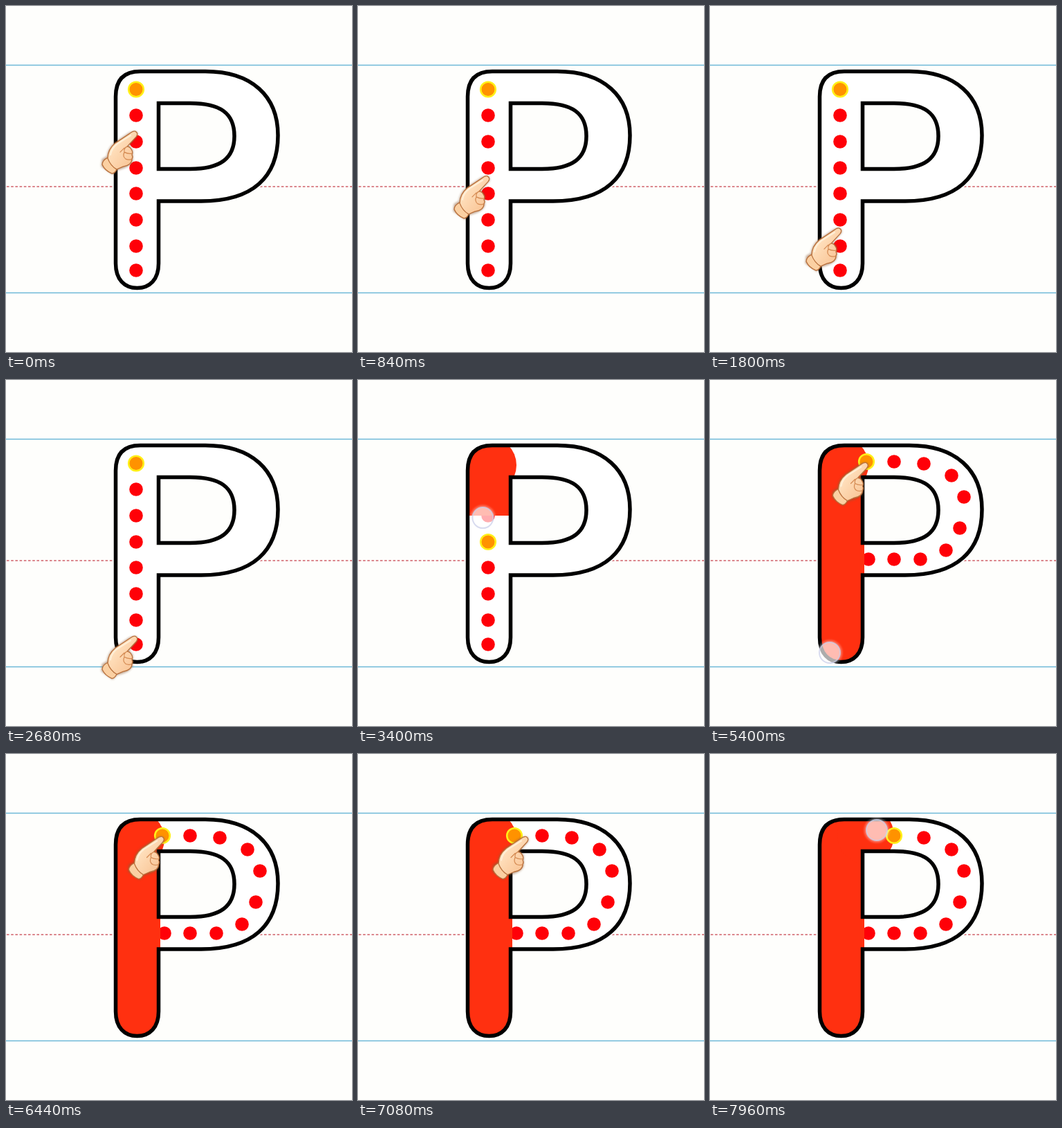
Write an HTML page that moves like this. It is 500 by 500 pixels and loops after 8000 ms.

```html
<!DOCTYPE html>
<html lang="en">
<head>
<meta charset="utf-8">
<title>Letter tracing</title>
<style>
  html, body { margin: 0; width: 100%; height: 100%; overflow: hidden; background: #fefefc; }
  svg { display: block; width: 100%; height: 100%; }
</style>
</head>
<body>
<svg viewBox="0 0 500 500">
  <defs>
    <path id="letter" fill-rule="evenodd" clip-rule="evenodd" d="
      M158.5 131C158.5 107 170 94.5 194 94.5H288C355 94.5 393 130 393 187
      C393 247 357 282 282 282H220.5V372C220.5 395 208 407.5 189.500 407.5
      C171 407.5 158.500 395 158.5 372Z
      M220.5 140.500H266C310 140.500 330 155 330 188C330 220 310 235.500 266 235.500H220.5Z"/>
    <clipPath id="inside"><use href="#letter"/></clipPath>
    <linearGradient id="skin" x1="0" y1="0" x2="1" y2="1">
      <stop offset=".3" stop-color="#ffe0bd"/>
      <stop offset="1" stop-color="#f7bd8b"/>
    </linearGradient>
    <filter id="soft" x="-30%" y="-30%" width="160%" height="160%">
      <feGaussianBlur stdDeviation="1.6"/>
    </filter>
  </defs>

  <path d="M0 85.500H500M0 414.500H500" stroke="#6db8d8" stroke-width="1.600"/>
  <path d="M1 261H500" stroke="#d0606a" stroke-width="1.500" stroke-dasharray="3.600 2.600"/>
  <use href="#letter" fill="#fff" stroke="#fefefc" stroke-width="9"/>
  <g id="dots" fill="#ff0008"></g>
  <g clip-path="url(#inside)" fill="#ff3010">
    <circle id="stemCap" cx="188" cy="123" r="41"/>
    <rect id="stem" x="153" y="123" width="70"/>
    <circle id="bowlCap" cx="225" cy="118" r="41"/>
  </g>
  <use href="#letter" fill="none" stroke="#000" stroke-width="5.500"/>
  <circle id="active" r="10.800" fill="#ff9200" stroke="#fff019" stroke-width="2.600"/>

  <g id="touch">
    <circle r="18" fill="#fff" opacity=".35" filter="url(#soft)"/>
    <circle r="15" fill="#fff" fill-opacity=".5" stroke="#cbcfea" stroke-opacity=".75" stroke-width="2"/>
  </g>

  <!-- Drawn with the fingertip at the origin -->
  <g id="hand" stroke-linejoin="round" stroke-linecap="round">
    <path d="M-6 0L-27 14Q-37 22-38 34L-45 38L-46 47L-31 58L-25 52Q-6 48-3 39
      L-3 24L-9 18L4 3Q5-5-6 0Z" fill="#8b5a35" stroke="#8b5a35" stroke-width="3"
      opacity=".5" filter="url(#soft)"/>
    <path d="M-38 35Q-46 39-46 45Q-42 54-32 58Q-28 58-25 52Z"
      fill="#fbd0a2" stroke="#b9713d" stroke-width="1.300"/>
    <path d="M-6 0L-27 14Q-38 23-38 36Q-34 47-25 52L-16 48Q-3 46-3 37
      Q-1 34-3 31Q-1 27-4 23Q-6 19-10 19L3 5Q7 0 2-3Q-1-4-6 0Z"
      fill="url(#skin)" stroke="#b9713d" stroke-width="1.300"/>
    <path d="M-10 19Q-15 21-14 27Q-9 30-3 29M-14 27Q-17 33-12 37Q-7 39-3 37
      M-14 21L-20 27" fill="none" stroke="#d48a52" stroke-width="1.200"/>
    <path d="M-34 31Q-33 22-24 15L-5 3" fill="none" stroke="#fff0d9" stroke-width="2"/>
  </g>
</svg>
<script>
const LOOP = 8000;
const HAND_PERIOD = 5100;
const STEM_DONE = 5080;
const stemDots = [120.5, 158, 196, 234, 271, 309, 347, 382].map(y => [188, y]);
const bowlDots = [[226, 118], [266, 118], [309, 121], [349, 138], [367, 169],
  [361, 214], [341, 246], [304, 259], [266, 259], [229, 259]];
// Each stop: time, x, y
const stemDrag = [[2850, 184, 118], [4080, 176, 299], [4950, 173, 394]];
const bowlDrag = [[7450, 228, 112], [7960, 241, 110]];

const el = id => document.getElementById(id);
const clamp = v => Math.min(1, Math.max(0, v));
const show = (node, visible) => node.setAttribute('display', visible ? 'inline' : 'none');
const place = (node, [x, y]) => node.setAttribute('transform', `translate(${x} ${y})`);
const easeSine = u => (1 - Math.cos(Math.PI * clamp(u))) / 2;

function along(stops, t) {
  let i = 1;
  while (i < stops.length - 1 && t > stops[i][0]) i++;
  const [a, b] = [stops[i - 1], stops[i]];
  const u = clamp((t - a[0]) / (b[0] - a[0]));
  return [a[1] + (b[1] - a[1]) * u, a[2] + (b[2] - a[2]) * u];
}

function dotGroup(points) {
  const group = document.createElementNS('http://www.w3.org/2000/svg', 'g');
  group.innerHTML = points.map(([x, y]) => `<circle cx="${x}" cy="${y}" r="9.800"/>`).join('');
  el('dots').append(group);
  return group;
}
const stemGroup = dotGroup(stemDots);
const bowlGroup = dotGroup(bowlDots);

function render(t) {
  const onBowl = t >= STEM_DONE;
  const stemTouched = t >= stemDrag[0][0];
  const bowlTouched = t >= bowlDrag[0][0];
  const finger = along(bowlTouched ? bowlDrag : stemDrag, t);

  // The fill advances from dot to dot as the finger reaches them
  const reached = !stemTouched ? 0 : onBowl ? stemDots.length
    : stemDots.filter(([, y]) => finger[1] + 6 >= y).length;
  const stemEnd = reached === stemDots.length ? 420 : reached > 1 ? stemDots[reached - 1][1] : 123;
  show(el('stemCap'), reached > 0);
  el('stem').setAttribute('height', stemEnd - 123);
  show(el('bowlCap'), bowlTouched);

  show(stemGroup, !onBowl);
  show(bowlGroup, onBowl);
  const target = onBowl ? bowlDots[bowlTouched ? 1 : 0] : stemDots[reached];
  show(el('active'), target);
  if (target) place(el('active'), target);

  const release = bowlTouched ? 0 : clamp((t - 5420) / 230);
  show(el('touch'), stemTouched && release < 1);
  el('touch').setAttribute('opacity', 1 - release);
  place(el('touch'), finger);

  show(el('hand'), t < 2780 || onBowl && t < 7420);
  place(el('hand'), onBowl
    ? [223.500 + 430 * easeSine((t - 6420) / HAND_PERIOD), 122.500]
    : [185, 123 + 266 * easeSine((t + 1622) / HAND_PERIOD)]);
}

const start = performance.now();
function tick() {
  render((performance.now() - start) % LOOP);
  requestAnimationFrame(tick);
}
tick();
</script>
</body>
</html>
```
